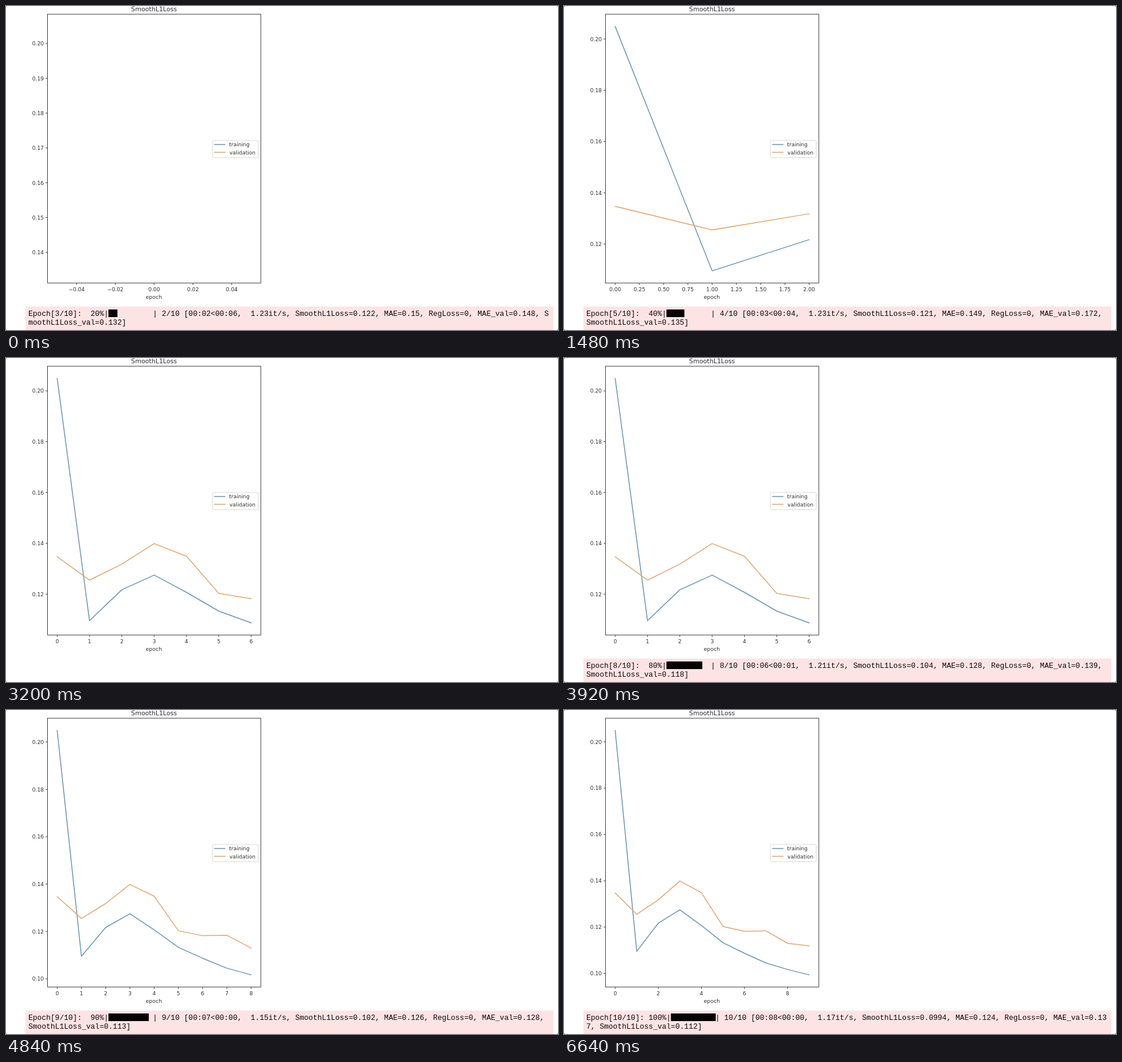
These frames come from a looping animation (938x552 px, 6960 ms). An HTML page:

```html
<!DOCTYPE html>
<html lang="en">
<head>
<meta charset="utf-8">
<title>Training progress</title>
<style>
html, body { margin: 0; width: 100%; height: 100%; overflow: hidden; background: #fff; }
svg { display: block; }
text { white-space: pre; fill: #303030; font: 8.95px "DejaVu Sans", sans-serif; }
.title { font-size: 10.74px; }
.log text { fill: #0c0405; font: 12.6px "Liberation Mono", monospace; }
.axis { fill: none; stroke: #3a3a3a; stroke-width: 1; }
.curve { fill: none; stroke-width: 1.5; stroke-linejoin: round; stroke-linecap: square; }
.train { stroke: #6a94b0; }
.valid { stroke: #dfa76f; }
.mid { text-anchor: middle; }
.end { text-anchor: end; }
</style>
</head>
<body>
<svg width="938" height="552" viewBox="0 0 938 552">
  <path fill="#999" d="M0 0h2l-2 2zM938 0v2l-2-2zM0 552v-2l2 2zM938 552h-2l2-2z"/>
  <text class="title mid" x="251.5" y="9">SmoothL1Loss</text>
  <g id="ticks"></g>
  <path id="train" class="curve train"/>
  <path id="valid" class="curve valid"/>
  <rect class="axis" x="70.5" y="14" width="362.5" height="458"/>
  <text class="mid" x="251.2" y="498.5">epoch</text>
  <rect x="351" y="229" width="77.5" height="29.5" rx="2" fill="#fff" stroke="#d9d9d9"/>
  <path class="curve train" d="M354.5 236H372"/>
  <path class="curve valid" d="M354.5 249.3H372"/>
  <text x="379.3" y="239.4">training</text>
  <text x="379.8" y="252.8">validation</text>
  <g class="log" id="log">
    <rect x="33" y="512" width="897" height="40" fill="#fde4e4"/>
    <text id="line1" x="38" y="527.5"></text>
    <text id="line2" x="38" y="542.5"></text>
    <rect id="bar" y="517" height="13" fill="#080203"/>
  </g>
</svg>
<script>
const LOOP = 6960, COLS = 117, CHAR = 7.56;
const BOX = { left: 70.5, right: 433, top: 14, bottom: 472 };
const train = [.2049, .10954, .1217, .1275, .1207, .1133, .1087, .1045, .1017, .0994];
const valid = [.1347, .1255, .1318, .1399, .1349, .1203, .1182, .1184, .113, .1119];

// Logged errors, starting at epoch 3
const mae = [.15, .153, .149, .14, .135, .128, .126, .124];
const maeVal = [.148, .178, .172, .137, .133, .139, .128, .137];

// Times in ms at which each part of the log moves on by one
const labelAt = [720, 1480, 2320, 3120, 3920, 4720, 5490];
const metricAt = [...labelAt.slice(0, 6), 5560];
const doneAt = [80, 800, 1560, 2360, 3240, 3920, 4840, 5640];
const chartAt = [40, 1520, 3200, 4800, 5600];
const clearAt = [3200, 4800];
const START = 2515, CLEAR = 40;

const $ = id => document.getElementById(id);
const label = (x, y, cls, s) => `<text class="${cls}" x="${x}" y="${y}">${s}</text>`;
const tick = d => `<path class="axis" d="${d}"/>`;
const passed = (times, t) => times.filter(at => at <= t).length;
const round3 = v => +v.toPrecision(3);

// Axis limits with a 5% margin, mapped to pixels from a to b
function scale(lo, hi, a, b) {
  const pad = (hi - lo) * .05 || .055;
  lo -= pad;
  hi += pad;
  return { lo, hi, at: v => a + (v - lo) / (hi - lo) * (b - a) };
}

function each(s, step, fn) {
  for (let i = Math.ceil(s.lo / step); i * step <= s.hi; i++) fn(i * step, s.at(i * step));
}

function drawChart(n) {
  const a = train.slice(0, n), b = valid.slice(0, n), all = a.concat(b);
  const xs = scale(0, n - 1, BOX.left, BOX.right);
  const ys = scale(Math.min(...all), Math.max(...all), BOX.bottom, BOX.top);
  const step = { 1: .02, 3: .25, 5: .5, 10: 2 }[n] || 1;
  const digits = n < 5 ? 2 : n < 7 ? 1 : 0;
  let out = "";
  each(xs, step, (v, x) => {
    const s = v.toFixed(digits).replace("-", "\u2212");
    out += tick(`M${x} 472v3.2`) + label(x, 486.2, "mid", s);
  });
  each(ys, n > 1 ? .02 : .01, (v, y) => {
    out += tick(`M70.5 ${y}h-3.2`) + label(64.3, y + 3.4, "end", v.toFixed(2));
  });
  $("ticks").innerHTML = out;
  const path = d => n > 1 ? "M" + d.map((v, i) => `${xs.at(i)} ${ys.at(v)}`).join("L") : "";
  $("train").setAttribute("d", path(a));
  $("valid").setAttribute("d", path(b));
}

function speed(done) {
  if (done > 8) return done > 9 ? 1.17 : 1.15;
  return done > 7 ? 1.21 : done > 5 ? 1.22 : 1.23;
}

function drawLog(t) {
  const epoch = 3 + passed(labelAt, t), done = 2 + passed(doneAt, t), row = passed(metricAt, t);
  const last = Math.max(0, ...[...labelAt, ...metricAt, ...doneAt].filter(at => at <= t));
  const spent = Math.floor((START + last) / 1000);
  const rate = speed(done), left = Math.floor((10 - done) / rate);
  const head = `Epoch[${epoch}/10]: ${String(done * 10).padStart(3)}%|`;
  const s = `${head}${" ".repeat(10)}| ${done}/10 [00:0${spent}<00:0${left},  ${rate.toFixed(2)}it/s, ` +
    `SmoothL1Loss=${round3(+train[row + 2].toFixed(row < 7 ? 3 : 4))}, MAE=${mae[row]}, RegLoss=0, ` +
    `MAE_val=${maeVal[row]}, SmoothL1Loss_val=${+valid[row + 2].toFixed(3)}]`;
  $("line1").textContent = s.slice(0, COLS);
  $("line2").textContent = s.slice(COLS).trimStart();
  $("bar").setAttribute("x", 38 + head.length * CHAR);
  $("bar").setAttribute("width", done * 7.62);
  $("log").style.display = clearAt.some(at => t >= at && t < at + CLEAR) ? "none" : "";
}

let shown = 0;
function draw(ms) {
  const t = ms % LOOP;
  const n = Math.min(10, 1 + 2 * passed(chartAt, t));
  if (n !== shown) drawChart(shown = n);
  drawLog(t);
}

const start = performance.now();
function loop() {
  draw(performance.now() - start);
  requestAnimationFrame(loop);
}
loop();
</script>
</body>
</html>
```
